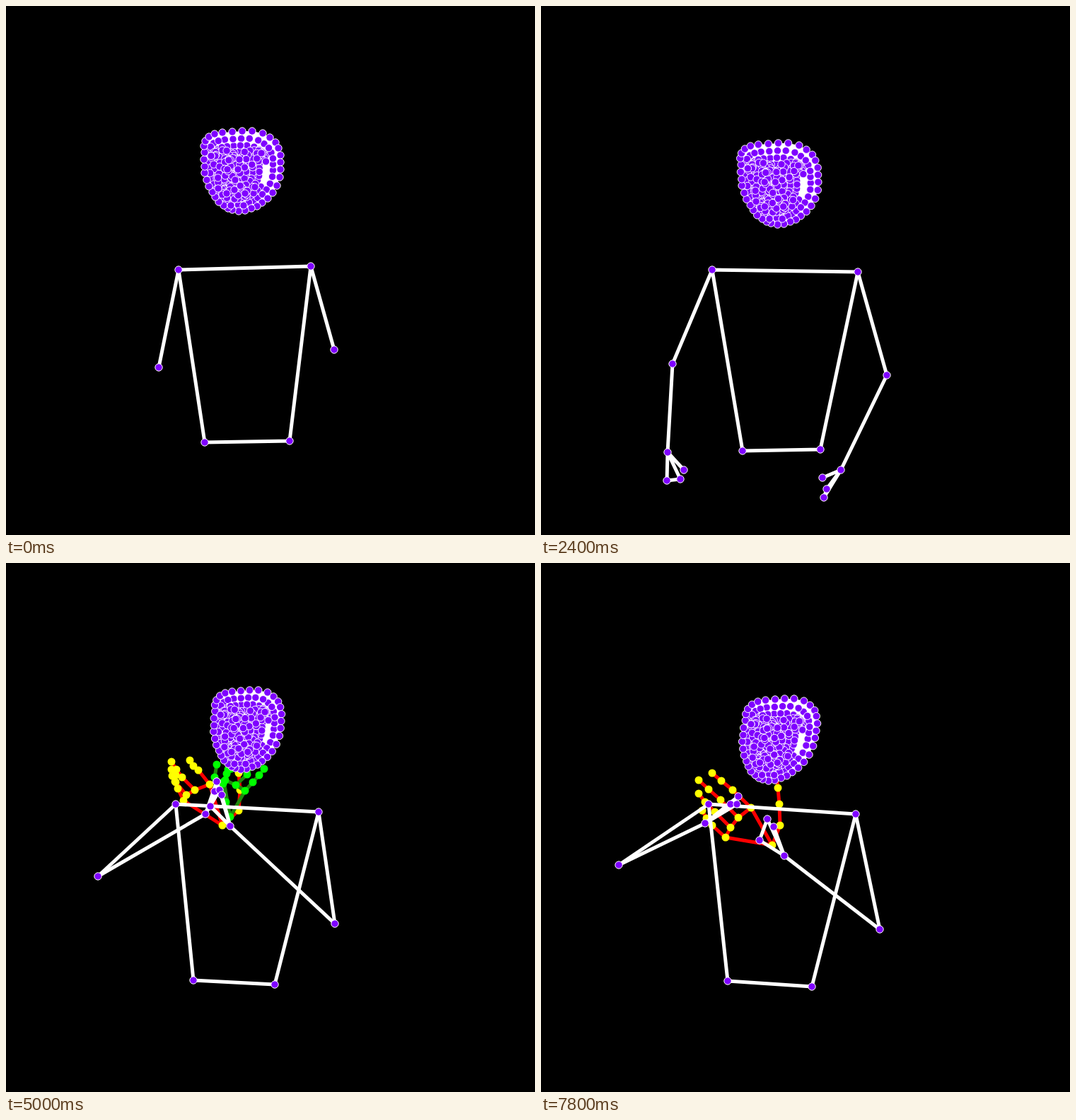
Write an HTML page that moves like this. It is 748 px wide and 748 px high and loops after 8 s.

```html
<!DOCTYPE html>
<html lang="en">
<head>
<meta charset="utf-8">
<title>Body tracking</title>
<style>
html, body { margin: 0; width: 100%; height: 100%; overflow: hidden; background: #000; }
svg { display: block; width: 100%; height: 100%; }
.bone { fill: none; stroke: #fff; stroke-width: 5; stroke-linejoin: round; }
.dot { fill: #7f00ff; stroke: #fff; stroke-width: 1; }
.right { stroke: #f00; }
.left { stroke: #1f8a0c; }
.tipR { fill: #ff0; }
.tipL { fill: #0f0; }
</style>
</head>
<body>
<svg id="stage" viewBox="0 0 748 748"></svg>
<script>
const STEP = 200, STEPS = 40;

// time, then x,y of shoulders, elbows, hips (left, right)
const torso = [
  [0, 244,373, 431,368, 216,511, 464,486, 281,617, 401,615],
  [1600, 244,372, 442,374, 200,514, 483,512, 277,621, 401,623],
  [2400, 242,373, 448,376, 186,506, 489,522, 285,629, 395,627],
  [3400, 239,365, 449,368, 153,518, 497,534, 278,605, 393,607],
  [4800, 240,345, 443,355, 138,450, 471,512, 268,608, 383,615],
  [5000, 240,341, 442,352, 130,443, 465,510, 265,590, 380,596],
  [6600, 240,341, 446,355, 117,420, 474,518, 263,590, 377,601],
  [7800, 237,341, 445,355, 110,427, 479,518, 264,591, 383,599]
];

// time, then x,y of wrist, pinky, index, thumb
const leftArm = [
  [1800, 176,655, 174,696, 190,694, 196,682],
  [2000, 173,688, 171,730, 188,728, 194,714],
  [2400, 179,631, 178,671, 197,669, 202,656],
  [3400, 216,460, 256,443, 255,425, 254,418],
  [5000, 282,355, 295,323, 298,309, 302,321],
  [6600, 237,341, 267,321, 279,312, 275,324],
  [7800, 232,368, 268,341, 279,330, 277,341]
];
const rightArm = [
  [1200, 484,530, 489,528, 489,528, 489,528],
  [1600, 480,543, 491,539, 491,539, 491,539],
  [2000, 455,690, 440,734, 442,724, 434,708],
  [2400, 424,656, 400,695, 404,683, 398,667],
  [3400, 348,514, 305,501, 308,479, 321,480],
  [5000, 317,372, 289,344, 298,309, 305,328],
  [6600, 342,388, 311,359, 324,335, 328,345],
  [7800, 344,414, 309,392, 320,362, 329,373]
];

// time, then wrist and four joints for each of five fingers
const rightHand = [
  [5000, 306,371, 329,350, 331,321, 329,297, 326,280,
    288,313, 272,293, 265,287, 260,279, 267,321, 249,303, 241,292, 234,281,
    255,328, 240,310, 235,301, 234,292, 251,336, 243,319, 239,309, 240,300],
  [6600, 321,379, 334,350, 335,317, 329,293, 332,274,
    297,320, 273,293, 255,278, 242,266, 277,333, 252,305, 235,288, 222,275,
    262,346, 241,320, 231,305, 224,293, 252,357, 237,336, 231,325, 226,315],
  [7800, 327,399, 338,371, 337,341, 335,318, 333,300,
    297,346, 271,321, 255,308, 242,297, 279,360, 254,335, 237,320, 223,307,
    268,374, 246,352, 232,338, 223,326, 261,388, 242,371, 234,361, 228,350]
];
const leftHand = [
  [5000, 317,359, 311,338, 307,312, 295,303, 298,285,
    308,309, 312,298, 314,292, 316,280, 310,307, 318,291, 322,280, 325,270,
    325,314, 341,299, 347,288, 350,278, 338,322, 349,310, 358,300, 365,291]
];

// time, then left, top, right, bottom and sideways lean of the chin
const face = [
  [0, 280,177,388,290, 0], [600, 282,172,390,286, 0], [1200, 284,180,392,293, 0],
  [1600, 285,185,393,297, 0], [2400, 283,194,392,309, 2], [3400, 287,190,396,312, -5],
  [5000, 293,180,388,292, -4], [5400, 292,177,388,290, -4],
  [6600, 287,187,388,301, -7], [7800, 284,192,387,308, -9]
];

const contour = pairs([
  334,177, 348,177, 363,180, 373,186, 381,193, 385,201, 388,211, 388,221, 388,231,
  387,242, 383,254, 377,264, 370,272, 362,278, 355,283, 347,286, 338,289, 329,290,
  320,288, 314,286, 308,282, 301,277, 296,270, 292,263, 287,255, 284,246, 281,236,
  281,227, 280,217, 281,207, 280,198, 282,191, 287,185, 295,181, 306,179, 320,178
]);
const sketch = pairs([300,234, 307,223, 314,222, 322,220, 329,242, 349,220, 359,220, 367,222, 381,234]);
const mouth = pairs([311,264, 349,262]);
const mesh = makeMesh();

function pairs(list) {
  const out = [];
  for (let i = 0; i < list.length; i += 2) out.push([list[i], list[i + 1]]);
  return out;
}

function sample(keys, t) {
  let i = 0;
  while (i < keys.length - 1 && keys[i + 1][0] <= t) i++;
  const a = keys[i], b = keys[i + 1] || a;
  const k = a === b ? 0 : Math.max(0, (t - a[0]) / (b[0] - a[0]));
  return a.slice(1).map((v, j) => v + (b[j + 1] - v) * k);
}

function makeMesh() {
  let seed = 11;
  const rand = () => (seed = seed * 16807 % 2147483647) / 2147483647;
  const dots = [];
  const ellipse = (x, y, rx, ry, n) => {
    for (let i = 0; i < n; i++) {
      const a = i / n * Math.PI * 2;
      dots.push([x + rx * Math.cos(a), y + ry * Math.sin(a)]);
    }
  };
  for (const k of [.83, .67, .52, .37, .22]) {
    contour.forEach(([x, y], i) => {
      if (k === .67 && i > 6 && i < 11) return;
      dots.push([326 + (x - 326) * k, 238 + (y - 238) * k]);
    });
  }
  for (const x of [306, 351]) {
    ellipse(x, 212, 16, 8, 16);
    ellipse(x, 212, 10, 4, 16);
  }
  ellipse(323, 264, 18, 9, 20);
  ellipse(323, 264, 11, 4, 20);
  ellipse(321, 240, 11, 8, 14);
  for (let i = 0; i < 70; i++) {
    const a = rand() * Math.PI * 2, r = Math.sqrt(rand());
    dots.push([314 + 27 * r * Math.cos(a), 238 + 36 * r * Math.sin(a)]);
  }
  for (let i = dots.length - 1; i > 0; i--) {
    const j = Math.floor(rand() * (i + 1));
    [dots[i], dots[j]] = [dots[j], dots[i]];
  }
  const top = [[315,218], [330,217], [313,231], [328,231], [324,246], [290,212], [361,208],
    [300,258], [312,265], [338,265], [352,256], [318,282], [336,282]];
  return dots.concat(contour, top);
}

const path = (pts, cls = '') =>
  `<path class="bone ${cls}" d="M${pts.map(p => p[0].toFixed(1) + ' ' + p[1].toFixed(1)).join('L')}"/>`;
const circles = (pts, cls = 'dot', r = 5.2) =>
  pts.map(p => `<circle class="${cls}" cx="${p[0].toFixed(1)}" cy="${p[1].toFixed(1)}" r="${r}"/>`).join('');

function drawHand(keys, arm, t, line, tip) {
  const now = sample(arm, t), ref = sample(arm, keys[0][0]);
  const follow = t < keys[0][0] || keys.length === 1;
  const dx = follow ? now[0] - ref[0] : 0, dy = follow ? now[1] - ref[1] : 0;
  const p = pairs(sample(keys, t)).map(([x, y]) => [x + dx, y + dy]);
  let out = path([p[0], p[5], p[9], p[13], p[17], p[0]], line);
  for (let i = 1; i < 21; i += 4) out += path((i === 1 ? [p[0]] : []).concat(p.slice(i, i + 4)), line);
  return out + circles(p, tip, 5.5);
}

function drawFace(t) {
  const [x0, y0, x1, y1, lean] = sample(face, t);
  if (t >= 6400 && t <= 6800) {
    const base = sample(face, 6600);
    const move = ([x, y]) => [x + x0 - base[0], y + y0 - base[1]];
    const s = sketch.map(move), m = mouth.map(move);
    return path(s) + path(m) + circles(s.concat(m));
  }
  const place = ([x, y]) => {
    const v = (y - 233.5) / 56.5;
    return [(x0 + x1) / 2 + (x - 334) / 108 * (x1 - x0) + lean * v,
      (y0 + y1) / 2 + v * (y1 - y0) / 2];
  };
  const rim = contour.map(place).map(p => p.map(v => v.toFixed(1)).join()).join(' ');
  return `<polygon points="${rim}" fill="#fff"/>` + circles(mesh.map(place));
}

function drawBody(t) {
  const [ls, rs, le, re, lh, rh] = pairs(sample(torso, t));
  const joints = [ls, rs, le, re, lh, rh];
  let out = path([le, ls, rs, re]) + path([ls, lh, rh, rs]);
  for (const [arm, elbow] of [[leftArm, le], [rightArm, re]]) {
    if (t < arm[0][0]) continue;
    const [wrist, pinky, index, thumb] = pairs(sample(arm, t));
    out += path([elbow, wrist, pinky, index, wrist, thumb]);
    joints.push(wrist, pinky, index, thumb);
  }
  return out + circles(joints);
}

const stage = document.getElementById('stage');
let shown = -1;

function render(time) {
  const step = Math.floor(time / STEP) % STEPS;
  if (step !== shown) {
    shown = step;
    const t = step * STEP;
    let out = '';
    if (t >= 4400) out += drawHand(rightHand, rightArm, t, 'right', 'tipR');
    if (t >= 4600 && t <= 5400) out += drawHand(leftHand, leftArm, t, 'left', 'tipL');
    stage.innerHTML = out + drawFace(t) + drawBody(t);
  }
}

const start = performance.now();
function tick() {
  render(performance.now() - start);
  requestAnimationFrame(tick);
}
tick();
</script>
</body>
</html>
```
